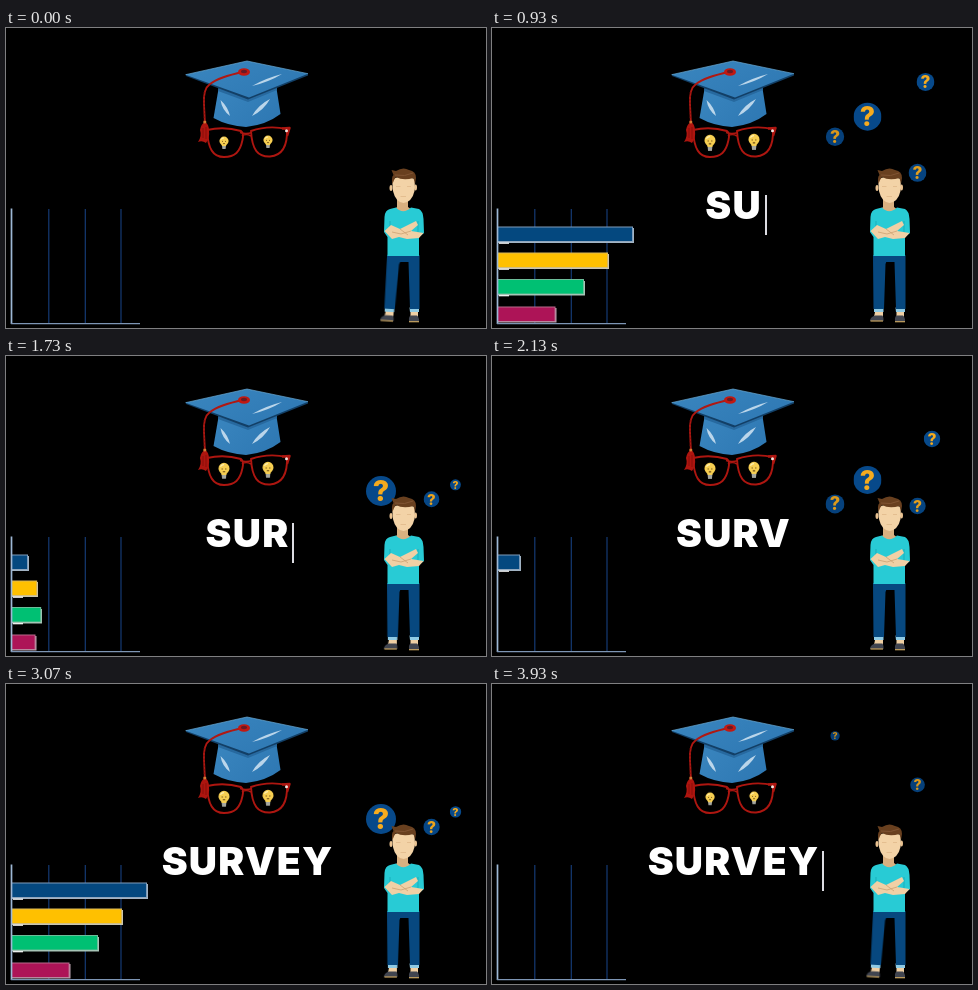
Recreate the animation shown at these times as an HTML page. Size 480 by 300 pixels, loop 3.99 s.

```html
<!DOCTYPE html>
<html lang="en">
<head>
<meta charset="utf-8">
<title>Survey</title>
<style>
html, body { margin: 0; width: 100%; height: 100%; overflow: hidden; background: #000; }
.stage { position: relative; width: 480px; height: 300px; overflow: hidden; background: #000; }
svg { position: absolute; inset: 0; }

/* Typed word */
.word {
  position: absolute; left: 0; top: 157px; width: 483px; text-align: center; white-space: nowrap;
  font: 900 39px/40px Inter, "Open Sans", sans-serif; letter-spacing: 1.2px; color: #fff;
}
.word b { font-weight: inherit; font-size: 0; letter-spacing: 0; animation: 3990ms step-end infinite; }
.word b:nth-child(1) { animation-name: type1; }
.word b:nth-child(2) { animation-name: type2; }
.word b:nth-child(3) { animation-name: type3; }
.word b:nth-child(4) { animation-name: type4; }
.word b:nth-child(5) { animation-name: type5; }
.word b:nth-child(6) { animation-name: type6; }
@keyframes type1 { 10%, 100% { font-size: 39px; letter-spacing: 1.2px; } }
@keyframes type2 { 22.5%, 100% { font-size: 39px; letter-spacing: 1.2px; } }
@keyframes type3 { 35%, 100% { font-size: 39px; letter-spacing: 1.2px; } }
@keyframes type4 { 47.5%, 100% { font-size: 39px; letter-spacing: 1.2px; } }
@keyframes type5 { 60%, 100% { font-size: 39px; letter-spacing: 1.2px; } }
@keyframes type6 { 72.5%, 100% { font-size: 39px; letter-spacing: 1.2px; } }
.caret {
  position: absolute; top: 10px; margin-left: 3px; width: 2px; height: 40px; background: #dcdce2;
  opacity: 0; animation: blink 997.5ms step-end infinite;
}
@keyframes blink { 0% { opacity: 0; } 50%, 100% { opacity: 1; } }

/* Bars slide out from behind the axis */
.bar { animation: 1995ms linear infinite; transform: translateX(var(--off)); }
.blue { --off: -138px; animation-name: blue; }
.yellow { --off: -113px; animation-name: yellow; }
.green { --off: -89px; animation-name: green; }
.pink { --off: -60px; animation-name: pink; }
@keyframes blue { 0%, .8%, 90%, 100% { transform: translateX(var(--off)); } 34%, 66.5% { transform: none; } }
@keyframes yellow { 0%, 8%, 92%, 100% { transform: translateX(var(--off)); } 33%, 71% { transform: none; } }
@keyframes green { 0%, 14%, 94%, 100% { transform: translateX(var(--off)); } 36%, 74% { transform: none; } }
@keyframes pink { 0%, 30.5%, 95%, 100% { transform: translateX(var(--off)); } 46.6%, 76% { transform: none; } }
.mark { opacity: 0; animation: mark 1995ms step-end infinite; }
@keyframes mark { 0%, 84% { opacity: 0; } 4% { opacity: 1; } }

/* Rising question marks */
.ask { animation: 1330ms linear infinite; }
#ask text { font: 800 19px Inter, "Open Sans", sans-serif; text-anchor: middle; fill: #f6ab1e; }
.ask1 { animation-name: ask1; }
.ask2 { animation-name: ask2; }
.ask3 { animation-name: ask3; }
.ask4 { animation-name: ask4; }
@keyframes ask1 {
  0%, 10% { transform: translate(375px, 137px) scale(0); }
  24%, 30.8%, 56% { transform: translate(375px, 135px) scale(1.5); }
  60.2% { transform: translate(375.5px, 124px) scale(1.4); }
  69.9% { transform: translate(375.5px, 89px) scale(1.4); }
  85% { transform: translate(375px, 49px) scale(.7); }
  92%, 100% { transform: translate(375px, 44px) scale(0); }
}
@keyframes ask2 {
  0%, 44% { transform: translate(343px, 150px) scale(0); }
  54%, 60.2% { transform: translate(343px, 148px) scale(.95); }
  69.9% { transform: translate(343px, 109px) scale(.92); }
  95.5% { transform: translate(343px, 52px) scale(.48); opacity: .85; }
  99%, 100% { transform: translate(343px, 45px) scale(0); opacity: 0; }
}
@keyframes ask3 {
  0%, 12% { transform: translate(425px, 150px) scale(0); }
  30.8% { transform: translate(425.5px, 143px) scale(.82); }
  60.2% { transform: translate(425.5px, 150px) scale(.82); }
  69.9% { transform: translate(425.5px, 145px) scale(.9); }
  95.5% { transform: translate(425.5px, 101px) scale(.75); opacity: .9; }
  99%, 100% { transform: translate(425px, 94px) scale(0); opacity: 0; }
}
@keyframes ask4 {
  0%, 16% { transform: translate(448px, 146px) scale(0); }
  30.8% { transform: translate(449.5px, 128px) scale(.57); }
  45% { transform: translate(450px, 110px) scale(.75); }
  60.2% { transform: translate(440px, 83px) scale(.82); }
  69.9% { transform: translate(433.5px, 54px) scale(.9); }
  82% { transform: translate(432px, 47px) scale(.6); }
  90%, 100% { transform: translate(432px, 44px) scale(0); }
}

.bulb { animation: glow 1330ms ease-in-out infinite; }
@keyframes glow { 0%, 100% { transform: none; } 35%, 72% { transform: scale(1.2, 1.3); } }
.leg { transform-origin: 387px 229px; animation: sway 1330ms ease-in-out infinite; }
@keyframes sway { 0%, 100% { transform: rotate(3.5deg); } 35%, 72% { transform: none; } }
</style>
</head>
<body>
<div class="stage">
<svg width="480" height="300" viewBox="0 0 480 300">
  <defs>
    <clipPath id="plot"><path d="M6 178H200V300H6Z"/></clipPath>
    <g id="ask">
      <circle r="10" fill="#07498a"/>
      <text y="6.9">?</text>
    </g>
    <g id="bulb">
      <path d="M-2 2.5H2L1.6 6H-1.6Z" fill="#a5a7a0"/>
      <path d="M-2 3C-2 1.5-4.6.5-4.6-2A4.6 4.4 0 0 1 4.6-2C4.6.5 2 1.5 2 3Z" fill="#f7cf52"/>
      <path d="M-2-1.6H-1M1-1.6H2M-1 .6H1" stroke="#6b4a14" stroke-width=".8"/>
      <path d="M-3-3.4Q-2-5 0-5" fill="none" stroke="#fff1b4"/>
    </g>
    <linearGradient id="felt" x2="1" y2=".6">
      <stop stop-color="#3a86bf"/><stop offset="1" stop-color="#2f79b4"/>
    </linearGradient>
  </defs>

  <!-- Chart -->
  <path d="M42.8 181V295M79.3 181V295M115 181V295" stroke="#143a74" stroke-width="1.2"/>
  <g clip-path="url(#plot)">
    <g class="bar blue">
      <path d="M6 200H142V215H6Z" fill="#a3b4c4"/><path d="M6 198.500H141V213.500H6Z" fill="#7e9cba"/>
      <path d="M6 199.500H140V213H6Z" fill="#04487f"/>
    </g>
    <g class="bar yellow">
      <path d="M6 226H117V241H6Z" fill="#c9c5b0"/><path d="M6 224.500H116V239.500H6Z" fill="#d9b75a"/>
      <path d="M6 225.500H115V239H6Z" fill="#ffc000"/>
    </g>
    <g class="bar green">
      <path d="M6 253H93V267.500H6Z" fill="#a6c4b6"/><path d="M6 251H92V266H6Z" fill="#6dbd9a"/>
      <path d="M6 252H91V265.500H6Z" fill="#00c073"/>
    </g>
    <g class="bar pink">
      <path d="M6 280H64.500V294.500H6Z" fill="#bda5b2"/><path d="M6 278.500H63.500V293.500H6Z" fill="#b76a8c"/>
      <path d="M6 279.500H62.500V293H6Z" fill="#ad1457"/>
    </g>
  </g>
  <g stroke="#fff" stroke-width="1.2">
    <path class="mark" d="M7 215.200H17"/>
    <path class="mark" d="M7 241.200H17" style="animation-delay:130ms"/>
    <path class="mark" d="M7 267.700H17" style="animation-delay:260ms"/>
  </g>
  <path d="M5.500 180.500V296" stroke="#9db7d5" stroke-width="1.7"/>
  <path d="M5 295.700H134" stroke="#7d95b4" stroke-width="1.3"/>

  <!-- Cap -->
  <path d="M213 58L207.500 90Q222 98 240 99Q260 97 274.500 86L270 57Z" fill="url(#felt)"/>
  <path d="M212 63L242 74 271 62 270.500 57H213Z" fill="#27699f"/>
  <path d="M180 48L242 71.500 302 47.500V45.500L180 46Z" fill="#123f66"/>
  <path d="M179.500 46.700L241 33 302 45.700 243 69.500Z" fill="url(#felt)"/>
  <path d="M179.500 46.700L241 33 302 45.700" fill="none" stroke="#69a9d5" stroke-width=".7"/>
  <path d="M246 58Q260 50 276 46Q263 54 246 58ZM214.500 72Q222 79 224 88Q216 82 214.500 72ZM246 88Q252 77 264 71Q258 82 246 88Z" fill="#d3e6f4" opacity=".85"/>
  <path d="M237 44Q213 49 204 56Q197 61 198 76L199 96" fill="none" stroke="#b01812" stroke-width="1.8"/>
  <path d="M198 64V95" stroke="#670b08" stroke-width=".8" stroke-dasharray="1.500 2"/>
  <ellipse cx="238" cy="44" rx="6" ry="3.800" fill="#c11912"/>
  <ellipse cx="238" cy="43.500" rx="3" ry="1.700" fill="#681a24"/>

  <!-- Glasses -->
  <g fill="none" stroke="#ad1610" stroke-width="1.900" stroke-linejoin="round">
    <path d="M201 102Q218 98 235 103Q238 105 236.500 112C234 124 229 129 218 129C207 129 202 121 201 102Z"/>
    <path d="M245 103Q262 97 281 101Q282 127 264 128.500C252 129 246 122 245 103Z"/>
    <path d="M234 104.500Q240 106.500 246 104.500M236 108Q240 105 245 108" stroke-width="1.600"/>
    <path d="M276 100.500L283.500 100 281 108" stroke-width="2.500"/>
  </g>
  <circle cx="280.500" cy="102.700" r="1.500" fill="#f5e4df"/>
  <path d="M199 94Q203 96 203 103Q204 110 200 115Q196 112 192 114Q196 108 194 102Q195 96 199 94Z" fill="#ad150f"/>
  <path d="M197 100V110M200 99V111" stroke="#7b0e0a" stroke-width=".7"/>
  <circle cx="198.800" cy="94" r="1.600" fill="#d57a35"/>
  <g transform="translate(218 115)"><use href="#bulb" class="bulb"/></g>
  <g transform="translate(262 114)"><use href="#bulb" class="bulb"/></g>

  <!-- Question marks -->
  <use href="#ask" class="ask ask1"/>
  <use href="#ask" class="ask ask2"/>
  <use href="#ask" class="ask ask3"/>
  <use href="#ask" class="ask ask4"/>

  <!-- Man -->
  <g class="leg">
    <path d="M382 279.500H391.500V284H382Z" fill="#8fcbe5"/>
    <path d="M383 284H391V289H382Z" fill="#efcfa3"/>
    <path d="M378 293Q378 289 383 287.500H390.500Q392 290 391.500 293Z" fill="#414550"/>
    <path d="M378.500 293H391" stroke="#c8a45f" stroke-width="1.200"/>
    <path d="M381 227H397L393.500 236 392 281H381.500Z" fill="#07487f"/>
  </g>
  <path d="M403.500 279.500H413V284H404Z" fill="#8fcbe5"/>
  <path d="M404.500 284H412V289H404.500Z" fill="#efcfa3"/>
  <path d="M403 293Q402.500 288 405 287.500H411Q413.500 290 413 294H403Z" fill="#414550"/>
  <path d="M403 293.700H413" stroke="#c8a45f" stroke-width="1.200"/>
  <path d="M381.500 227H413.500V281H404L402.500 234H383Z" fill="#07487f"/>
  <path d="M391 170H402V179L406 182Q397 189 388 182L391 179Z" fill="#d9b080"/>
  <path d="M390 179.500Q397 187 405 179.500L413 181Q417 183 417.500 191L418 205 413 209V228H381.500V209L378 204 378.500 189Q379 182 384 181Z" fill="#28cbd5"/>
  <path d="M384 193V205M412 193V206" stroke="#18a8b5" stroke-width=".8"/>
  <path d="M378.500 203L385 197 394 201 402 197 410 193 412 197 405 203 417.500 205 413 210 401 211 393 209 386 211Z" fill="#f1d0a5"/>
  <path d="M386 204L395 206 405 203M394 201L402 207" stroke="#cda274" stroke-width=".8" fill="none"/>
  <ellipse cx="385" cy="160" rx="1.500" ry="3" fill="#e9c291"/>
  <ellipse cx="409.500" cy="159.500" rx="1.500" ry="3" fill="#e9c291"/>
  <path d="M386 151Q397 146 409 151L408.500 163Q406 174 397.500 175Q389.500 174 387 163Z" fill="#f3d3a7"/>
  <path d="M390 158.500H394.500M401 158.500H405M394.500 168.500H400" stroke="#dfb687" stroke-width=".7"/>
  <path d="M386.500 156Q385 149 387.500 147L385.500 142 390 143Q397 138.500 403 142Q410 143 410 150L409 156 407.500 150Q397 153 390 149Q387.500 152 386.500 156Z" fill="#69401f"/>
  <path d="M389 147Q399 149 407 145" stroke="#805433" fill="none"/>
</svg>
<div class="word"><b>S</b><b>U</b><b>R</b><b>V</b><b>E</b><b>Y</b><span class="caret"></span></div>
</div>
</body>
</html>
```
